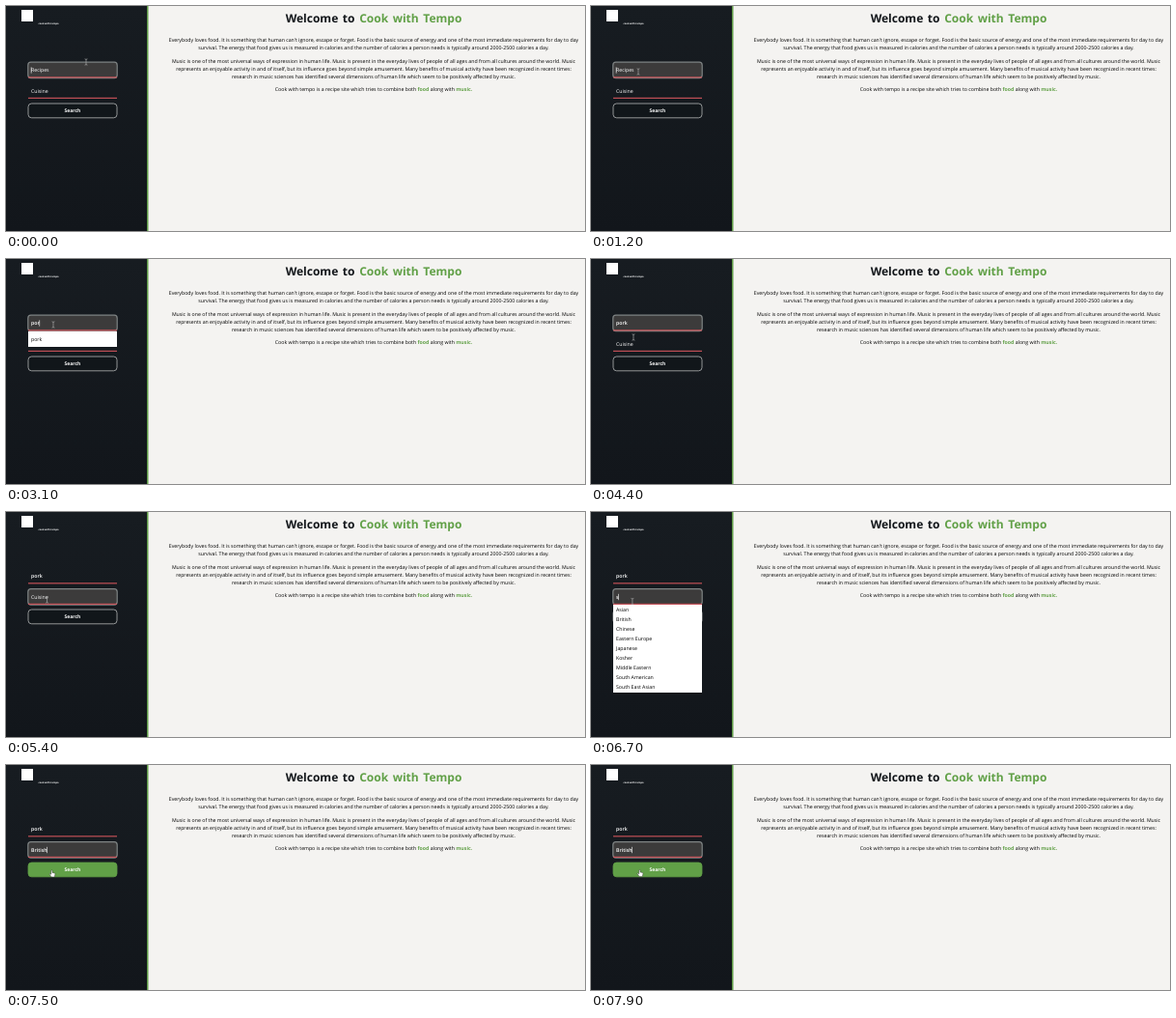
Animation of 600x233 px, one loop 8000 ms. Source, as an HTML page:

```html
<!DOCTYPE html>
<html lang="en">
<head>
<meta charset="utf-8">
<title>Recipe search</title>
<style>
  html, body { margin: 0; height: 100%; overflow: hidden; background: #f4f3f1; }
  svg { display: block; width: 100vw; height: 100vh; }
  text {
    font: 5.23px "Open Sans", "Noto Sans", sans-serif;
    text-rendering: geometricPrecision;
    fill: #000;
  }
  .mid text { text-anchor: middle; }
  .mid tspan { fill: #61a047; font-weight: 700; }
  .mid .title { font-size: 12px; font-weight: 700; word-spacing: 1.5px; fill: #12161a; }
  .light { fill: #fff; }
  .value { fill: #fff; font-weight: 600; }
  .search { font-size: 5px; font-weight: 700; fill: #fff; text-anchor: middle; }
  .tag { font-size: 2.5px; font-weight: 700; fill: #fff; }
</style>
</head>
<body>
<svg viewBox="0 0 600 233" preserveAspectRatio="none">
  <defs>
    <linearGradient id="side" x2="0" y2="1">
      <stop stop-color="#171c21"/><stop offset="1" stop-color="#12161b"/>
    </linearGradient>
  </defs>
  <rect width="600" height="233" fill="#f4f3f1"/>
  <rect width="146" height="233" fill="url(#side)"/>
  <rect x="146" width="1.5" height="233" fill="#5f9c47"/>
  <rect x="16" y="4" width="12" height="12" fill="#fff"/>
  <text class="tag" x="33.5" y="18.7">cook with tempo</text>
  <g class="mid">
    <text class="title" x="381" y="17.2">Welcome to <tspan>Cook with Tempo</tspan></text>
    <text x="381" y="37">Everybody loves food. It is something that human can't ignore, escape or forget. Food is the basic source of energy and one of the most immediate requirements for day to day</text>
    <text x="381" y="45">survival. The energy that food gives us is measured in calories and the number of calories a person needs is typically around 2000-2500 calories a day.</text>
    <text x="381" y="58.7">Music is one of the most universal ways of expression in human life. Music is present in the everyday lives of people of all ages and from all cultures around the world. Music</text>
    <text x="381" y="66.6">represents an enjoyable activity in and of itself, but its influence goes beyond simple amusement. Many benefits of musical activity have been recognized in recent times:</text>
    <text x="381" y="74.5">research in music sciences has identified several dimensions of human life which seem to be positively affected by music.</text>
    <text x="381" y="88">Cook with tempo is a recipe site which tries to combine both <tspan>food</tspan> along with <tspan>music.</tspan></text>
  </g>
  <g id="form"></g>
</svg>
<script>
const LOOP = 8000, LEFT = 23, WIDTH = 92;
const form = document.getElementById('form');
const ruler = document.createElement('canvas').getContext('2d');
ruler.font = '600 52.3px "Open Sans", "Noto Sans", sans-serif';

const recipes = ['paella', 'pancakes', 'pasta', 'pizza', 'pork', 'prawns', 'pumpkin'];
const cuisines = ['Asian', 'British', 'Chinese', 'Eastern Europe', 'Japanese', 'Kosher',
  'Middle Eastern', 'South American', 'South East Asian'];

// time, focused field, recipe, cuisine, suggestions
const steps = [
  [0, 0, '', '', []],
  [1600, 0, 'p', '', recipes],
  [2300, 0, 'po', '', ['pork']],
  [3000, 0, 'por', '', ['pork']],
  [3900, 0, 'pork', '', []],
  [4700, 1, 'pork', '', []],
  [6500, 1, 'pork', 's', cuisines],
  [7500, 1, 'pork', 'British', []]
];

// time, x, y of the pointer
const path = [
  [0, 83, 58], [100, 83, 58], [900, 49, 68], [3500, 49, 68], [3800, 45, 83], [4000, 45, 83],
  [4300, 44, 81], [4400, 44, 81], [4800, 43, 90], [5300, 43, 90], [5400, 42.5, 91],
  [6600, 42.5, 91], [7200, 48, 112.5], [7500, 48, 112.5], [7900, 51, 112], [LOOP, 51, 112]
];

const rect = (x, y, w, h, fill, more = '') =>
  `<rect x="${x}" y="${y}" width="${w}" height="${h}" fill="${fill}" ${more}/>`;
const text = (x, y, s, cls) => `<text class="${cls}" x="${x}" y="${y}">${s}</text>`;

function pointerAt(t) {
  const i = path.findIndex(p => p[0] > t);
  const [t0, x0, y0] = path[i - 1], [t1, x1, y1] = path[i];
  const k = (t - t0) / (t1 - t0), e = k * k * (3 - 2 * k);
  return [x0 + (x1 - x0) * e, y0 + (y1 - y0) * e];
}

function field(y, value, hint, focused, caretOn) {
  let s = '';
  if (focused) {
    s += rect(LEFT - .2, y - .3, WIDTH + .4, 16.4, '#3c3b3b', 'rx="3" stroke="#7f8484" stroke-width="1.2"');
  }
  s += rect(LEFT, y + 14.8, WIDTH, 1.1, '#d0545b');
  s += text(26, y + 9.7, value || hint, value ? 'value' : 'light');
  if (focused && caretOn) {
    s += rect(25.8 + ruler.measureText(value).width / 10, y + 4.8, .6, 6.4, '#fff');
  }
  return s;
}

function dropdown(top, pad, items, y) {
  let s = rect(LEFT, top, WIDTH, items.length * 10 + 2 * pad, '#fff');
  items.forEach((item, i) => {
    const rowTop = top + pad + i * 10, over = y >= rowTop && y < rowTop + 10;
    if (over) s += rect(LEFT, rowTop, WIDTH, 10, '#0b7ce8');
    s += text(26, rowTop + 6.9, item, over ? 'light' : '');
  });
  return s;
}

const beam = (x, y) => `<path transform="translate(${x} ${y})" fill="none" stroke="#a5a5a5"
  stroke-width=".7" d="M-1.4-3.2Q0-3.2 0-2.2V2.2Q0 3.2-1.4 3.2M1.4-3.2Q0-3.2 0-2.2M0 2.2Q0 3.2 1.4 3.2"/>`;
const hand = (x, y) => `<path transform="translate(${x} ${y})" fill="#fff" stroke="#222"
  stroke-width=".4" d="M-1.2-3.2Q-.5-3.8 0-3.2V-1L2.4-.5Q3-.2 2.9.6L2.3 3.4H-1L-2.9.6Q-2.9-.2-2.1 0L-1.2.8Z"/>`;

function draw(t) {
  const [since, focus, recipe, cuisine, items] = steps.filter(s => s[0] <= t).pop();
  const [x, y] = pointerAt(t);
  const caretOn = (t - since) % 1000 < 500;
  const open = items.length > 0;
  const onButton = !open && y > 101;
  const onItem = open && y > (focus ? 96 : 75);

  form.innerHTML =
    field(58.5, recipe, 'Recipes', focus === 0, caretOn) +
    field(80, cuisine, 'Cuisine', focus === 1, caretOn) +
    rect(LEFT, 101, WIDTH, 14.8, onButton ? '#61a047' : '#11161a',
      `rx="3.5" stroke="${onButton ? '#61a047' : '#b4b6b7'}" stroke-width=".8"`) +
    text(69, 110.2, 'Search', 'search') +
    (open ? focus ? dropdown(96, .5, items, y) : dropdown(75, 3, items, y) : '') +
    (onButton || onItem ? hand : beam)(x, y);
}

function tick(now) {
  draw(now % LOOP);
  requestAnimationFrame(tick);
}
draw(0);
requestAnimationFrame(tick);
</script>
</body>
</html>
```
